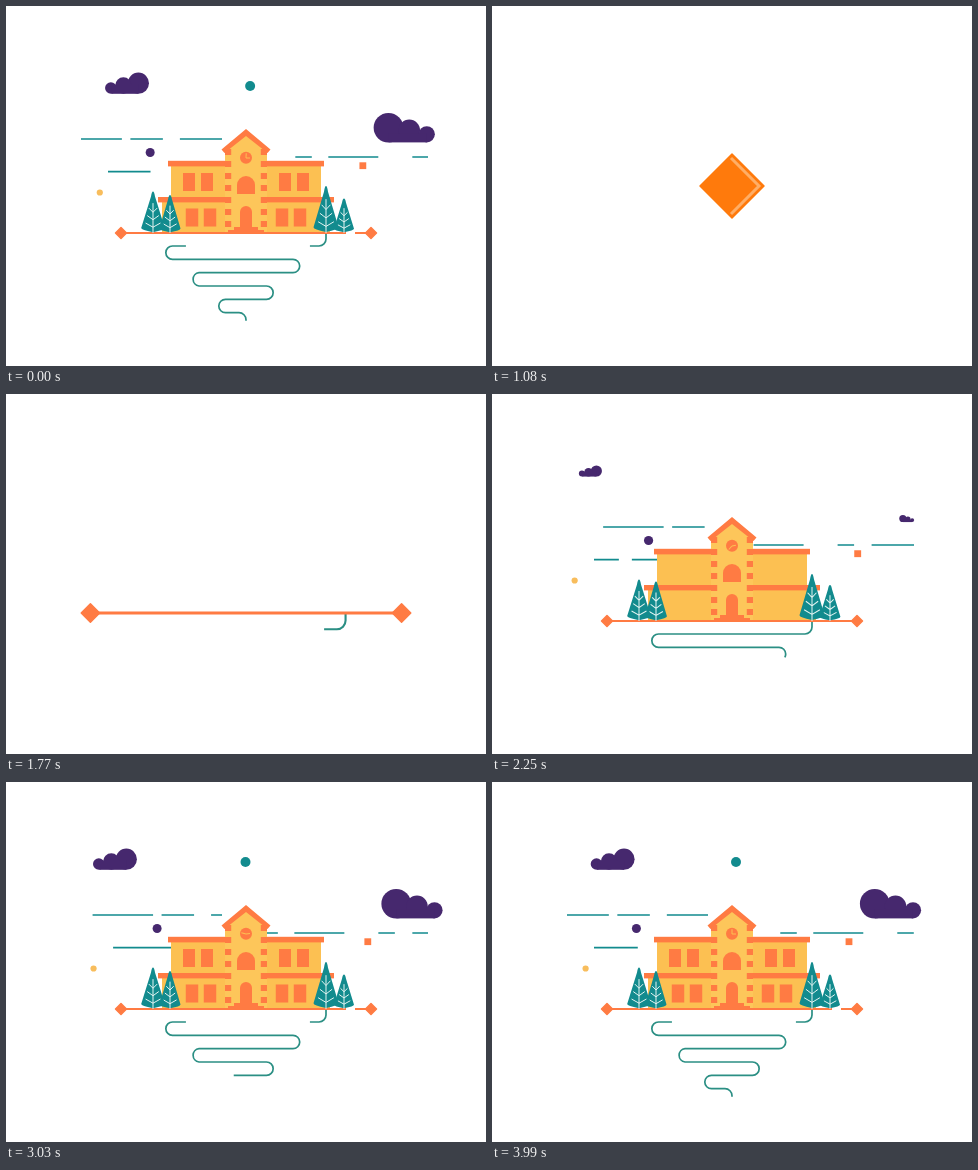
Write an HTML page that moves like this. It is 480 by 360 pixels and loops after 4020 ms.

```html
<!DOCTYPE html>
<html lang="en">
<head>
<meta charset="utf-8">
<title>School scene</title>
<style>
  html, body { margin: 0; width: 100%; height: 100%; overflow: hidden; background: #fff; }
  svg { display: block; width: 100vw; height: 100vh; }
</style>
</head>
<body>
<svg id="stage" viewBox="0 0 480 360" xmlns="http://www.w3.org/2000/svg"></svg>
<script>
const LOOP = 4020, GROUND = 227;
const ORANGE = '#ff7b43', YELLOW = '#fcc052', TOWER = '#fdc65a', TEAL = '#128b8e',
      LINE = '#2b8f84', PURPLE = '#46286e';

const stage = document.getElementById('stage');
const clamp = v => Math.max(0, Math.min(1, v));
const span = (t, from, length) => clamp((t - from) / length);
const easeOut = (u, power = 3) => 1 - (1 - u) ** power;
const easeInOut = u => u < .5 ? 4 * u ** 3 : 1 - 4 * (1 - u) ** 3;
const backOut = (u, k = 1.4) => 1 + (k + 1) * (u - 1) ** 3 + k * (u - 1) ** 2;
const pop = (t, from, length = 300, k = 1.4) => t < from ? 0 : backOut(span(t, from, length), k);

function add(parent, tag, attrs = {}) {
  const el = document.createElementNS('http://www.w3.org/2000/svg', tag);
  set(el, attrs);
  return parent.appendChild(el);
}
function set(el, attrs) {
  for (const name in attrs) el.setAttribute(name, attrs[name]);
}
const group = parent => add(parent, 'g');
const rect = (parent, x, y, width, height, fill = ORANGE) =>
  add(parent, 'rect', { x, y, width, height, fill });
const circle = (parent, cx, cy, r, fill) => add(parent, 'circle', { cx, cy, r, fill });
const path = (parent, d, fill = 'none', stroke = 'none', width = 1) =>
  add(parent, 'path', { d, fill, stroke, 'stroke-width': width });
const show = (el, on) => el.setAttribute('visibility', on ? 'visible' : 'hidden');

// Scale a group around a fixed point
const scaleAt = (el, x, y, sx, sy = sx, dx = 0, dy = 0) =>
  set(el, { transform: `translate(${x + dx} ${y + dy}) scale(${sx} ${sy}) translate(${-x} ${-y})` });

const world = group(stage);

// Wind lines: dash positions at t = 2700 that slide and are cut at both ends
const winds = [
  { y: 133, speed: -31.5, dashes: [[97, 157.5], [166, 198.5], [215.5, 290]],
    ends: t => [Math.max(75, 97 - .0315 * (t - 2700), 216 - 160 * easeOut(span(t, 1850, 350))), 216] },
  { y: 165.7, speed: -42, dashes: [[60, 108], [121, 200]],
    ends: t => [Math.max(102, 200 - 98 * easeOut(span(t, 1850, 350))), 200] },
  { y: 151, speed: 34.3, dashes: [[160, 210], [244, 260.5], [277, 327], [361, 377.5], [395, 445]],
    ends: t => [225, 225 + 197 * easeOut(span(t, 1800, 220))] }
];
for (const wind of winds) wind.el = path(world, '', 'none', TEAL, 1.7);

// Drifting dots; x is the position at t = 3990
const dots = [
  { x: 244, y: 80, speed: 4.7, start: 2250, r: 5, fill: TEAL },
  { x: 144.4, y: 146.5, speed: -7, start: 2000, r: 4.5, fill: PURPLE },
  { x: 93.6, y: 186.5, speed: 6.3, start: 1830, r: 3.1, fill: '#f8bd5c' },
  { x: 357, y: 159.7, speed: -5, start: 1980, r: 3.4, fill: ORANGE, square: true }
];
for (const dot of dots) {
  dot.el = group(world);
  if (dot.square) rect(dot.el, -dot.r, -dot.r, dot.r * 2, dot.r * 2, dot.fill);
  else circle(dot.el, 0, 0, dot.r, dot.fill);
}

// Clouds: puffs as [x, y, r] resting on a flat base
function cloud(puffs, base, from, to, speed, start) {
  const el = group(world);
  for (const [x, y, r] of puffs) circle(el, x, y, r, PURPLE);
  rect(el, from, base - 9, to - from, 9, PURPLE);
  return { el, speed, start, x: (from + to) / 2, y: base - 11 };
}
const clouds = [
  cloud([[132, 77.2, 10.6], [117, 79.5, 8.2], [104.5, 82, 5.8]], 87.8, 105, 132, 12.2, 2200),
  cloud([[382.7, 121.7, 14.8], [403.5, 124.3, 10.8], [421, 128.3, 8.1]], 136.4, 383, 421, -7.8, 2230)
];

const snake = path(world, 'M320 227v6a7 7 0 0 1-7 7H166.5a6.6 6.6 0 0 0 0 13.3H287a6.7 6.7 0 0 1 0 13.4' +
  'H193a6.7 6.7 0 0 0 0 13.3H260.5a6.6 6.6 0 0 1 0 13.3H219.5a6.7 6.7 0 0 0 0 13.4H233a7 7 0 0 1 7 7v1',
  'none', LINE, 1.7);
const snakeLength = snake.getTotalLength();

// School
const school = group(world);
rect(school, 156, 194, 168, 33, YELLOW);
rect(school, 165, 158, 150, 69, YELLOW);
rect(school, 162, 154.8, 156, 5.6);
rect(school, 152, 191, 176, 5.4);
path(school, 'M219 227V143L240 126L261 143V227Z', TOWER);
for (let i = 0; i < 7; i++) {
  rect(school, 219, 143 + i * 12, 6.2, 6);
  rect(school, 254.8, 143 + i * 12, 6.2, 6);
}
path(school, 'M240 123L264.5 143.5L261.5 147L240 130L218.5 147L215.5 143.5Z', ORANGE);
circle(school, 240, 151.8, 6, ORANGE);
const hourHand = path(school, 'M240 152H244', 'none', YELLOW, 1);
const minuteHand = path(school, 'M240 152V147.2', 'none', YELLOW, 1);
path(school, 'M231 188V179a9 9 0 0 1 18 0V188Z', ORANGE);
path(school, 'M234 222V206a6 6 0 0 1 12 0V222Z', ORANGE);
rect(school, 228, 221, 24, 3);
rect(school, 222, 224, 36, 3);

const windows = [];
function addWindow(x, y, width, height, start) {
  const el = group(school);
  rect(el, x - width / 2, y - height / 2, width, height);
  windows.push({ el, x, y, start });
}
for (const side of [-1, 1]) {
  addWindow(240 + side * 57, 176, 12, 18, 2568);
  addWindow(240 + side * 39, 176, 12, 18, 2492);
  addWindow(240 + side * 54, 211.5, 12.5, 18, 2432);
  addWindow(240 + side * 36, 211.5, 12.5, 18, 2400);
}

const groundLine = path(stage, '', 'none', ORANGE, 1.8);
const treeLayer = group(stage);

function tree(x, top, half, start) {
  const el = group(treeLayer), h = GROUND - top, y = f => top + h * f;
  path(el, `M${x} ${top}Q${x + 1.2} ${top} ${x + 2} ${y(.12)}L${x + half} ${y(.88)}` +
    `Q${x + half} ${y(.93)} ${x} ${y(.98)}Q${x - half} ${y(.93)} ${x - half} ${y(.88)}` +
    `L${x - 2} ${y(.12)}Q${x - 1.2} ${top} ${x} ${top}Z`, TEAL);
  let veins = `M${x} ${y(.28)}V${GROUND}`;
  [.5, .68, .86].forEach((f, i) => {
    const reach = half * (.35 + i * .14);
    veins += `M${x - reach} ${y(f - .1)}L${x} ${y(f)}L${x + reach} ${y(f - .1)}`;
  });
  path(el, veins, 'none', '#e3f4f2', 1);
  return { el, x, start };
}
const trees = [tree(164, 189, 10.5, 2000), tree(147, 185.5, 11.8, 1940),
               tree(338, 192.5, 10, 2000), tree(320, 180, 12.5, 1940)];

const ends = [-1, 1].map(side => ({ side,
  el: add(stage, 'path', { fill: ORANGE, stroke: ORANGE, 'stroke-linejoin': 'round', 'stroke-width': 1.5 }) }));

// Large centre diamond with its bright edge
const gem = group(stage);
set(path(gem, 'M240 148L272 180L240 212L208 180Z', '#ff7a0c', '#ff7a0c', 1.5), { 'stroke-linejoin': 'round' });
path(gem, 'M239 152L267 180L239 208', 'none', '#ffae66', 3);

function diamond(x, y, half) {
  const r = Math.max(0, half - 1);
  return `M${x} ${y - r}L${x + r} ${y}L${x} ${y + r}L${x - r} ${y}Z`;
}

// Camera zoom, ground height and diamond size on screen
function view(t) {
  if (t > 4458) {
    const zoom = Math.max(0, 1 - 2.26e-8 * (t - 4458) ** 3);
    return { zoom, y: 180 + 47 * zoom, half: 6.5 * zoom };
  }
  const split = easeInOut(span(t, 1100, 510)), settle = easeInOut(span(t, 1740, 420));
  return {
    zoom: 1.245 * split - .245 * settle,
    y: 180 + 33 * split + 6 * span(t, 1620, 150) + 8 * settle,
    half: 33 - 22.8 * split - 3.7 * settle
  };
}

// Dash pattern that leaves the given stretches of a drawn length empty
function dashes(length, gaps) {
  let at = 0;
  const parts = [];
  for (const [from, to] of gaps) {
    if (to > length) break;
    parts.push(from - at, to - from);
    at = to;
  }
  return [...parts, length - at, 2000].join(' ');
}

function render(clock) {
  const t = clock < 1090 ? clock + LOOP : clock;
  const { zoom, y, half } = view(t);
  const camera = `translate(240 ${y}) scale(${zoom}) translate(-240 ${-GROUND})`;
  set(world, { transform: camera });
  set(treeLayer, { transform: camera });

  for (const wind of winds) {
    const [lo, hi] = wind.ends(t), shift = wind.speed * (t - 2700) / 1000;
    let d = '';
    for (const [a, b] of wind.dashes) {
      const from = Math.max(lo, a + shift), to = Math.min(hi, b + shift);
      if (to > from) d += `M${from} ${wind.y}H${to}`;
    }
    set(wind.el, { d });
    show(wind.el, t > 1800);
  }

  const drift = (t - 3990) / 1000;
  for (const dot of dots)
    set(dot.el, { transform: `translate(${dot.x + dot.speed * drift} ${dot.y}) scale(${pop(t, dot.start)})` });
  for (const c of clouds)
    scaleAt(c.el, c.x, c.y, pop(t, c.start, 350), undefined, c.speed * drift);

  const drawn = snakeLength * easeOut(span(t, 1735, 2250), 2.8);
  const settled = t > 2760 && t < 4490;
  const gaps = settled ? [[26, 150]]
    : t > 2550 && t <= 2760 ? [[25, 49], [58, 107], [135, 149]] : [];
  set(snake, { 'stroke-dasharray': dashes(drawn, gaps) });
  show(snake, t > 1735);

  scaleAt(school, 240, GROUND, 1, pop(t, 1790, 330, 1.5));
  show(school, t > 1790);
  for (const w of windows) {
    const p = easeOut(span(t, w.start, 500));
    scaleAt(w.el, w.x, w.y, p, p, 0, w.y < 190 ? Math.min(8, (1 - p) * 30) : 0);
  }
  set(minuteHand, { transform: `rotate(${79 * drift} 240 152)` });
  set(hourHand, { transform: `rotate(${7 * drift} 240 152)` });
  for (const tr of trees) scaleAt(tr.el, tr.x, GROUND, pop(t, tr.start, 320));

  const reach = 125 * zoom, ruled = t > 2400 && t < 4490;
  set(groundLine, {
    d: ruled ? `M115 ${y}H340M349 ${y}H365` : `M${240 - reach} ${y}H${240 + reach}`,
    'stroke-width': t > 4458 ? 1.8 * zoom : 2.8 - easeInOut(span(t, 1740, 420))
  });
  for (const end of ends) {
    set(end.el, { d: diamond(240 + end.side * reach, y, half) });
    show(end.el, zoom > 0);
  }
  show(groundLine, zoom > 0);

  show(gem, t > 4790 || t < 1110);
  scaleAt(gem, 240, 180, t < 1110 ? 1 : pop(t, 4790, 240, 1));
}

function tick() {
  render(performance.now() % LOOP);
  requestAnimationFrame(tick);
}
tick();
</script>
</body>
</html>
```
